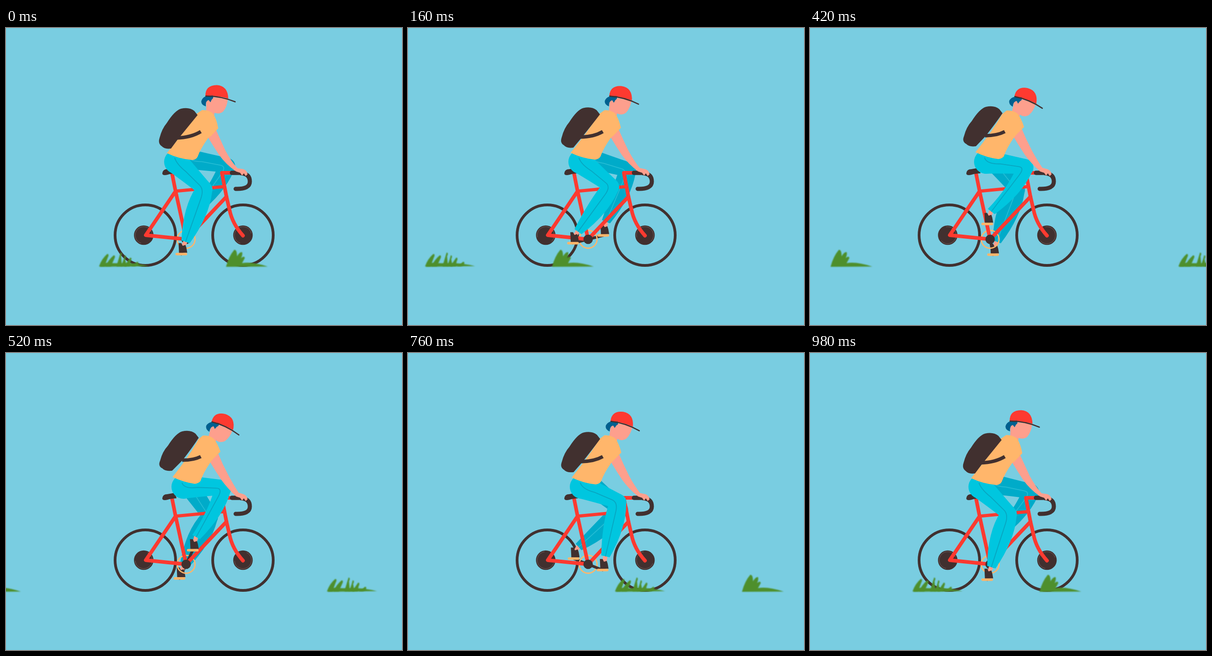
An HTML page with a canvas for the animation above (1000 ms loop, 864 by 648 pixels).

```html
<!DOCTYPE html>
<html lang="en">
<head>
<meta charset="utf-8">
<title>Cyclist</title>
<style>
  html, body { margin: 0; width: 100%; height: 100%; overflow: hidden; background: #79cde1; }
  canvas { display: block; width: 864px; height: 648px; }
</style>
</head>
<body>
<canvas id="stage" width="864" height="648"></canvas>
<script>
const ctx = document.getElementById('stage').getContext('2d');
const LOOP = 1000, STEP = 20, TAU = Math.PI * 2;
const SKY = '#79cde1', RED = '#fe3a30', DARK = '#41302f', SKIN = '#fd9f8d',
      TAN = '#ffb66b', HAIR = '#00608f', GREEN = '#4e8f2c',
      NEAR = '#00c6df', NEAR_SEAM = '#08a5c0', FAR = '#00abc9', FAR_SEAM = '#25bdd5';

const AXLE = { x: 393, y: 461 };

// Each pair: upright pose, leaning pose
const SHIRT = [
  'M428 179 L416 187 Q392 222 351 273 Q378 286 407 288 Q415 287 418 281 Q424 264 441 240 L447 236 L463 219 Q460 200 452 187 Q444 179 428 179Z',
  'M429 180 L419 188 Q400 222 361 271 Q386 283 411 286 Q419 285 423 280 Q429 262 445 239 L451 232 L467 216 Q461 197 453 187 Q444 179 429 180Z'];
const PACK = [
  'M382 176 Q400 172 411 181 L418 190 Q400 212 374 244 L360 263 Q346 265 340 258 Q331 252 335 240 Q340 220 351 207 Q368 180 382 176Z',
  'M384 172 Q402 168 413 177 L420 186 Q405 208 383 236 L362 258 Q347 260 341 253 Q331 248 336 236 Q341 216 353 203 Q370 176 384 172Z'];
const STRAP = ['M372 240 Q404 239 425 226', 'M382 235 Q408 235 425 226'];
const ARM = [
  'M440 236 L458 222 Q469 246 479 268 Q492 292 505 306 L518 308 Q526 311 527 319 L523 323 L519 317 L515 322 L511 316 L502 313 Q480 298 465 277 Q453 259 441 239Z',
  'M443 235 L462 220 Q472 244 484 267 Q496 289 507 305 L518 308 Q526 311 527 319 L523 323 L519 317 L515 322 L511 316 L502 313 Q482 295 469 277 Q457 259 445 239Z'];

const FACE = 'M440 150 L484 154 Q483 171 474 182 Q466 189 455 185 L454 193 L436 186 Q438 170 436 158Z';
const HAIR_SHAPE = 'M436 149 L451 147 Q454 153 449 156 L446 162 L442 157 Q435 159 436 171 Q426 168 426 160 Q428 152 436 149Z';
const CAP = 'M435 149 Q434 125 460 124.5 Q484 126 485 154 Q460 147 435 149Z';
const BRIM = 'M436 148.5 Q468 148 500 161';

const SADDLE = 'M341 317 Q342 308 352 308 L369 305 L372 317 Q358 318 353 320 Q341 323 341 317Z';
const TUBES = 'M362 316 L370 356 L393 461 M370 356 L305 452 L393 461 L481 368';
const TOP_TUBE = 'M370 356 L476 346';
const FORK = 'M493 316 L471 316 L481 368 L488 398 Q494 427 517 453';
const BARS = 'M513 317 Q532 318 532 335 Q532 352 501 351';
const SHOE = 'M-6 -24 L0 -24 L3 -18 L9 -20 L11 -14 L13 -3 L-5 -2Z';

const TUFT = 'M0 521 Q6 498 18 484 Q24 483 24 498 Q30 488 35 489 Q37 493 33 502 Q40 496 41 502 L35 513 Q56 509 91 520.5Z';
const BLADES = [[3, 19, 493], [17, 33, 496], [41, 48, 490], [51, 57, 496], [58, 69, 501], [69, 84, 510]];

const mix = (a, b, k) => ({ x: a.x + (b.x - a.x) * k, y: a.y + (b.y - a.y) * k });

function morph([a, b], k) {
  const to = b.match(/[\d.]+/g);
  let i = 0;
  return a.replace(/[\d.]+/g, n => +n + (to[i++] - n) * k);
}

function fill(d, color) {
  ctx.fillStyle = color;
  ctx.fill(new Path2D(d));
}

function line(d, color, width, cap = 'round') {
  ctx.strokeStyle = color;
  ctx.lineWidth = width;
  ctx.lineCap = cap;
  ctx.lineJoin = 'round';
  ctx.stroke(new Path2D(d));
}

function disc(x, y, r, color) {
  ctx.fillStyle = color;
  ctx.beginPath();
  ctx.arc(x, y, r, 0, TAU);
  ctx.fill();
}

function ring(x, y, r, color, width, from = 0, to = TAU) {
  ctx.strokeStyle = color;
  ctx.lineWidth = width;
  ctx.beginPath();
  ctx.arc(x, y, r, from, to);
  ctx.stroke();
}

// Half-widths run from a to b; the bulge pushes the middle of each side out.
function limb(a, b, front, back, color) {
  const d = Math.hypot(b.x - a.x, b.y - a.y);
  const nx = (b.y - a.y) / d, ny = (a.x - b.x) / d;
  const side = (p, w) => [p.x + nx * w, p.y + ny * w];
  const m = mix(a, b, 0.42);
  const belly = s => (s.from + s.to) / 2 + 2 * s.bulge;
  ctx.fillStyle = color;
  ctx.beginPath();
  ctx.moveTo(...side(a, front.from));
  ctx.quadraticCurveTo(...side(m, belly(front)), ...side(b, front.to));
  ctx.lineTo(...side(b, -back.to));
  ctx.quadraticCurveTo(...side(m, -belly(back)), ...side(a, -back.from));
  ctx.fill();
}

function kneeOf(hip, ankle, thigh = 86, calf = 121) {
  const dx = ankle.x - hip.x, dy = ankle.y - hip.y, d = Math.hypot(dx, dy);
  const along = (thigh * thigh - calf * calf + d * d) / (2 * d);
  const out = Math.sqrt(Math.max(0, thigh * thigh - along * along));
  return { x: hip.x + (dx * along + dy * out) / d, y: hip.y + (dy * along - dx * out) / d };
}

const pedalAt = a => ({ x: AXLE.x + 34 * Math.cos(a), y: AXLE.y + 34 * Math.sin(a) });

function crank(angle) {
  const p = pedalAt(angle);
  line(`M${AXLE.x} ${AXLE.y} L${p.x} ${p.y}`, DARK, 6);
}

function leg(hip, angle, color, seam, hipSize) {
  const p = pedalAt(angle), c = Math.cos(angle);
  const ankle = { x: p.x + 8.5 - 2.5 * c, y: p.y - 27.5 - 2.5 * c };
  const knee = kneeOf(hip, ankle);
  const reach = Math.hypot(ankle.x - hip.x, ankle.y - hip.y);

  line(`M${ankle.x} ${ankle.y - 2} L${p.x + 4} ${p.y - 15}`, SKIN, 9, 'butt');
  ctx.save();
  ctx.translate(p.x, p.y);
  fill(SHOE, DARK);
  line('M-10 0 L10 0', TAN, 5.5);
  ctx.restore();

  disc(hip.x, hip.y, hipSize, color);
  disc(knee.x, knee.y, 18.5, color);
  limb(hip, knee, { from: hipSize, to: 18.5, bulge: 0 }, { from: hipSize, to: 14, bulge: 0 }, color);
  limb(knee, ankle, { from: 18.5, to: 9.5, bulge: 8 },
    { from: 18, to: 9.5, bulge: (reach - 137) * 0.22 }, color);

  const a = mix(hip, knee, 0.36), b = mix(hip, knee, 0.84), e = mix(knee, ankle, 0.17);
  line(`M${hip.x - 3} ${hip.y - 9} Q${hip.x + 1} ${hip.y + 5} ${a.x} ${a.y}
        L${b.x} ${b.y} Q${knee.x} ${knee.y} ${e.x} ${e.y} L${ankle.x} ${ankle.y}`, seam, 1.8, 'butt');
}

function wheel(x, hubX, turn) {
  ring(x, 452, 66, DARK, 6);
  disc(hubX, 452, 21.3, DARK);
  ring(hubX, 452, 18.5, '#75625f', 0.9, turn, turn + 4.2);
}

function bike() {
  line(TUBES, RED, 8);
  line(TOP_TUBE, RED, 7);
  line(FORK, RED, 8);
  fill(SADDLE, DARK);
  line(BARS, DARK, 9);
  line('M493 316 L511 316', DARK, 9.5);
  disc(AXLE.x, AXLE.y, 10.3, DARK);
}

function head(lean) {
  ctx.save();
  ctx.translate(436, 201);
  ctx.rotate(lean * 12 * Math.PI / 180);
  ctx.translate(-436, -201);
  fill(FACE, SKIN);
  fill(CAP, RED);
  fill(HAIR_SHAPE, HAIR);
  line(BRIM, DARK, 2.6);
  ctx.restore();
}

function grass(start, t, draw) {
  const span = 1036;
  const x = (start + 108 - span * t / LOOP + span) % span - 108;
  ctx.save();
  ctx.translate(x, 0);
  ctx.filter = 'blur(1px)';
  draw();
  ctx.restore();
}

function blades() {
  fill('M0 521 L7 512 Q38 514 62 513 Q86 514 108 519.5Z', GREEN);
  for (const [x, tx, ty] of BLADES)
    fill(`M${x - 4} 520 Q${x + 2} ${ty + 10} ${tx - 2} ${ty} Q${tx + 3} ${ty} ${tx - 1} ${ty + 8} L${x + 8} 520Z`, GREEN);
}

function draw(t) {
  const sway = t < 520 ? t / 520 : (LOOP - t) / 480;
  const lean = sway / 0.81;
  const near = (108 / 360 + t / LOOP) * TAU, far = near + Math.PI;

  ctx.fillStyle = SKY;
  ctx.fillRect(0, 0, 864, 648);

  wheel(304, 300.5, near);
  wheel(517, 517, near);
  crank(far);
  leg({ x: 397, y: 286 }, far, FAR, FAR_SEAM, 22);
  ring(AXLE.x, AXLE.y, 19.5, TAN, 2.8);
  crank(near);
  bike();
  leg({ x: 371 + 16 * sway, y: 292 }, near, NEAR, NEAR_SEAM, 26);

  fill(morph(ARM, lean), SKIN);
  head(lean);
  fill(morph(SHIRT, lean), TAN);
  line(morph(STRAP, lean), DARK, 7.5, 'butt');
  fill(morph(PACK, lean), DARK);

  grass(204, t, blades);
  grass(480, t, () => fill(TUFT, GREEN));
}

function tick() {
  draw(Math.floor(performance.now() % LOOP / STEP) * STEP);
  requestAnimationFrame(tick);
}
tick();
</script>
</body>
</html>
```
